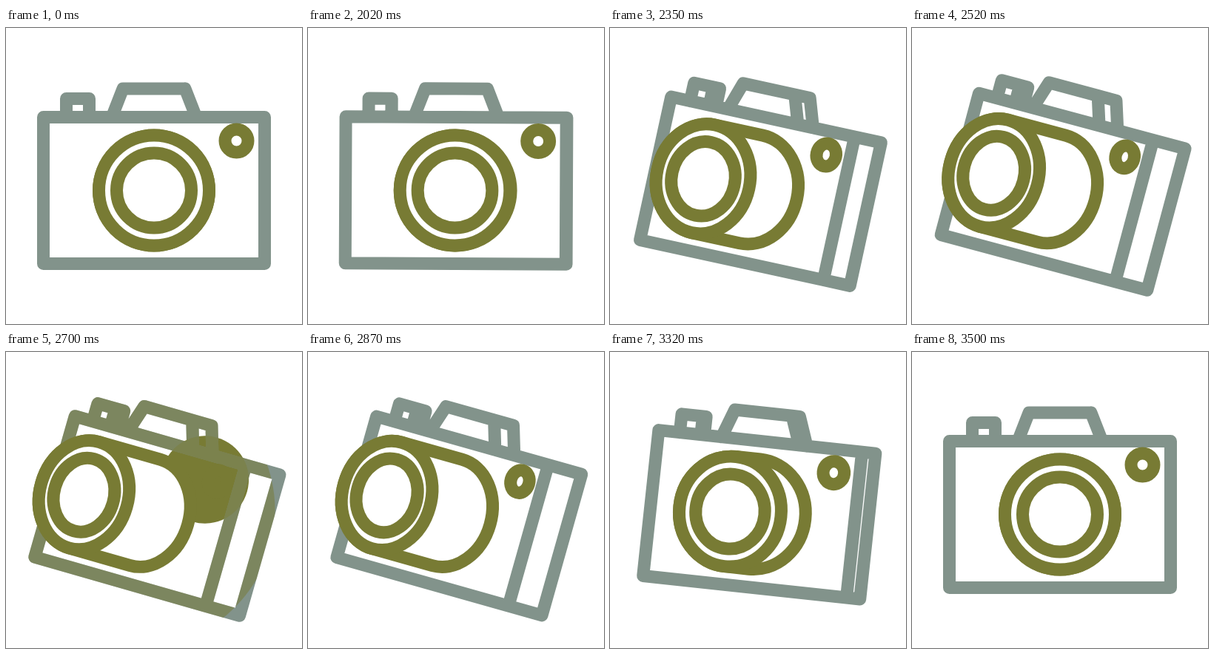
Recreate the animation shown at these times as an HTML page. Size 400x400 px, loop 3520 ms.

```html
<!DOCTYPE html>
<html lang="en">
<head>
<meta charset="utf-8">
<title>Camera</title>
<style>
  html, body { margin: 0; width: 100%; height: 100%; overflow: hidden; background: #fff; }
  svg { display: block; width: 100%; height: 100%; }
  .line { fill: none; stroke-width: 17; stroke-linecap: round; stroke-linejoin: round; }
  .grey { stroke: #82938b; }
  .olive { stroke: #787b34; }
  .solid { fill: #fff; }
  .fill { fill: #787b34; }
</style>
</head>
<body>
<svg viewBox="0 0 400 400">
  <defs>
    <clipPath id="glowClip"><circle id="glow" cx="-17" cy="19.5"/></clipPath>
    <clipPath id="discClip"><circle id="discEdge"/></clipPath>
  </defs>
  <g id="camera">
    <circle id="disc" class="fill"/>
    <path id="body" class="line grey"/>
    <g clip-path="url(#glowClip)"><path id="glowTint" class="line olive"/></g>
    <g clip-path="url(#discClip)"><path id="discTint" class="line olive" opacity=".4"/></g>
    <ellipse id="flash" class="line olive" cy="-47.5" ry="15.5"/>
    <path id="barrel" class="line olive solid"/>
    <ellipse id="rim" class="line olive solid" cy="19.5" ry="74.5"/>
    <ellipse id="glass" class="line olive solid" cy="19.5" ry="50.5"/>
  </g>
</svg>
<script>
const LOOP = 3520, START = 2000, HALF = 750;
const FLASH_START = 2650, FLASH_TIME = 200;
const $ = id => document.getElementById(id);
const set = (id, attrs) => {
  for (const name in attrs) $(id).setAttribute(name, attrs[name]);
};

// cubic-bezier(.25, .1, .25, 1)
function ease(x) {
  if (x <= 0) return 0;
  if (x >= 1) return 1;
  let lo = 0, hi = 1;
  for (let i = 0; i < 24; i++) {
    const u = (lo + hi) / 2;
    if (u * (.75 - .75 * u + u * u) < x) lo = u; else hi = u;
  }
  return lo * (.3 + 2.4 * lo - 1.7 * lo * lo);
}

// Outline of the box, hump and button; p is the amount of turn.
function bodyPath(p) {
  const k = 1 - .197 * p;
  const at = shift => (x, y) => `${x * k + shift * p} ${y}`;
  const front = at(-13.7), back = at(34), humpBack = at(13.6), knobBack = at(-1.5);
  const top = -79.5, bottom = 118.5, w = 149.5;
  return `M${front(-w, top)}L${front(w, top)}L${front(w, bottom)}L${front(-w, bottom)}Z` +
    `M${front(w, top)}L${back(w, top)}L${back(w, bottom)}L${front(w, bottom)}` +
    `M${front(-57, top)}L${front(-42, -118)}L${front(42, -118)}L${front(57, top)}` +
    `M${front(42, -118)}L${humpBack(42, -118)}L${humpBack(57, top)}` +
    `M${front(-118.5, top)}L${front(-118.5, -104.5)}L${front(-87.5, -104.5)}L${front(-87.5, top)}` +
    `M${front(-87.5, -104.5)}L${knobBack(-87.5, -104.5)}L${knobBack(-87.5, top)}`;
}

function draw(t) {
  const p = ease(1 - Math.abs(t - START - HALF) / HALF);
  const k = 1 - .197 * p;
  set('camera', { transform: `translate(200 200) rotate(${16 * p})` });

  const d = bodyPath(p);
  for (const id of ['body', 'glowTint', 'discTint']) set(id, { d });

  const lens = -93 * p, base = -6.9 * p, rx = 74.5 * k;
  set('barrel', {
    d: `M${lens} -55H${base}A${rx} 74.5 0 0 1 ${base} 94H${lens}A${rx} 74.5 0 0 1 ${lens} -55Z`
  });
  set('rim', { cx: lens, rx });
  set('glass', { cx: lens, rx: 50.5 * k });

  const flashX = 111.5 * k - 13.7 * p;
  set('flash', { cx: flashX, rx: 15.5 * k });

  const u = (t - FLASH_START) / FLASH_TIME;
  const s = u > 0 && u < 1 ? Math.sin(Math.PI * u) : 0;
  const disc = { cx: flashX - 24 * s, cy: -47.5 + 3 * s, r: s && 24 + 49 * s };
  set('disc', disc);
  set('discEdge', disc);
  set('glow', { r: 258 * s });
  set('glowTint', { opacity: .7 * s });
}

const begin = performance.now();
function tick() {
  draw((performance.now() - begin) % LOOP);
  requestAnimationFrame(tick);
}
tick();
</script>
</body>
</html>
```
